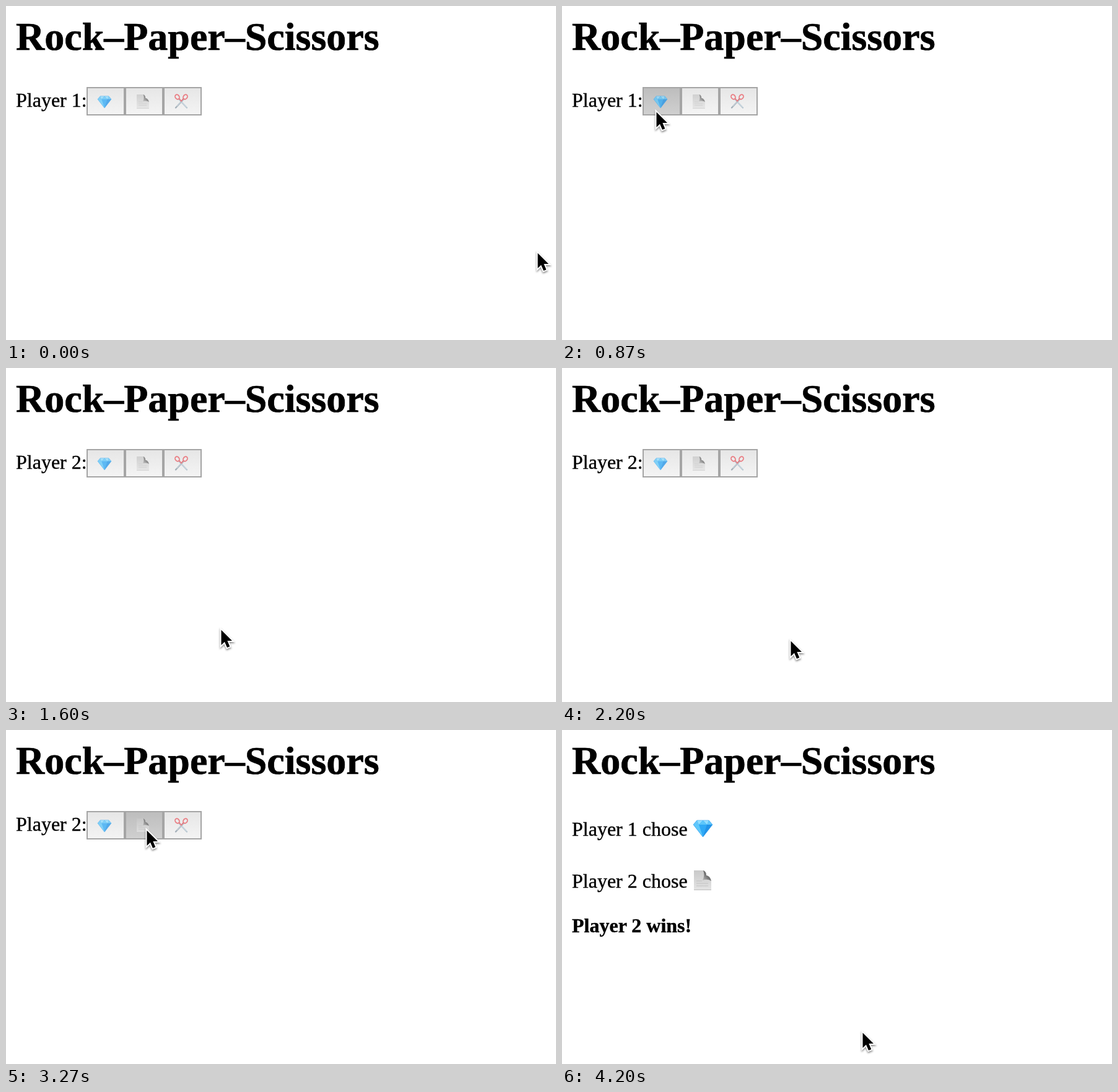
These frames come from a looping animation (888 by 540 pixels, 5.93 s). An HTML page:

```html
<!DOCTYPE html>
<html lang="en">
<head>
<meta charset="utf-8">
<title>Rock–Paper–Scissors</title>
<style>
  html, body { margin: 0; width: 100%; height: 100%; overflow: hidden; background: #fff; }
  svg { display: block; width: 888px; height: 540px; }
  text { font: 32px "Liberation Serif", Times, serif; fill: #000; stroke: #000; stroke-width: .4; }
  .bold { font-weight: bold; }
  #title { font-size: 64px; stroke-width: .7; }
  .key { fill: url(#face); stroke: #a5a5a5; stroke-width: 2; }
  .key.down { fill: url(#pressed); }
  .icon { opacity: .76; }
  #cursor { filter: drop-shadow(0 2px 1.5px rgba(0, 0, 0, .45)); }
</style>
</head>
<body>
<svg viewBox="0 0 888 540">
  <defs>
    <linearGradient id="face" x2="0" y2="1">
      <stop stop-color="#e6e6e6"/><stop offset="1" stop-color="#f4f4f4"/>
    </linearGradient>
    <linearGradient id="pressed" x2="0" y2="1">
      <stop stop-color="#bdbdbd"/><stop offset="1" stop-color="#d0d0d0"/>
    </linearGradient>
    <linearGradient id="sheet" x2="0" y2="1">
      <stop stop-color="#c9c9c9"/><stop offset="1" stop-color="#e4e4e4"/>
    </linearGradient>
    <linearGradient id="curl" x1="1" y1="0" x2="0" y2="1">
      <stop stop-color="#3c3c3c"/><stop offset=".55" stop-color="#777"/><stop offset="1" stop-color="#c4c4c4"/>
    </linearGradient>

    <g id="gem">
      <path d="M6 1H25L31 8L15.5 28L0 8Z" fill="#2fa9f6"/>
      <path d="M6 1L9 8H0ZM25 1L22 8H31Z" fill="#62c6fa"/>
      <path d="M6 1H15.5L9 8ZM25 1H15.5L22 8Z" fill="#93deff"/>
      <path d="M15.5 1L9 8H22Z" fill="#5cc6fb"/>
      <path d="M0 8H9L15.5 28Z" fill="#5fc8fb"/>
      <path d="M31 8H22L15.5 28Z" fill="#2293e8"/>
      <path d="M0 8L6 1H25L31 8L15.5 28Z" fill="none" stroke="#3aa2ec" stroke-width=".6"/>
    </g>

    <g id="paper">
      <path d="M0 0H16Q20 2 20 8Q26 9 28 16V32H0Z" fill="url(#sheet)"/>
      <path d="M15 0Q20 2 20 8Q26 9 28 17Q22 13 14 16Q18 8 15 0Z" fill="url(#curl)"/>
      <path d="M4 17H13M4 21H23M4 25H23" stroke="#c2c2c2"/>
      <path d="M0 31.5H28" stroke="#bcbcbc"/>
    </g>

    <g id="scissors" fill="none" stroke-linecap="round">
      <path d="M7.5 9L20 22.5" stroke="#9fb4c2" stroke-width="2.2"/>
      <path d="M14.5 9L2 22.5" stroke="#8798a4" stroke-width="2.2"/>
      <path d="M8.5 10L19.5 21.5M13.5 10L4 20" stroke="#d3e2ec"/>
      <path d="M8 8L11 12L14 8" stroke="#e0525a" stroke-width="1.6"/>
      <ellipse cx="4.5" cy="5" rx="3.2" ry="4" transform="rotate(-35 4.5 5)" stroke="#ea5a62" stroke-width="1.8"/>
      <ellipse cx="17.5" cy="5" rx="3.2" ry="4" transform="rotate(35 17.5 5)" stroke="#ea5a62" stroke-width="1.8"/>
    </g>
  </defs>

  <text id="title" class="bold" x="16" y="71">Rock–Paper–Scissors</text>

  <g id="choosing">
    <text id="turn" x="16" y="163">Player 1:</text>
    <rect class="key" x="131" y="132" width="60" height="44"/>
    <rect class="key" x="193" y="132" width="60" height="44"/>
    <rect class="key" x="255" y="132" width="60" height="44"/>
    <use class="icon" href="#gem" transform="translate(148 145) scale(.71)"/>
    <use class="icon" href="#paper" transform="translate(211 143) scale(.71)"/>
    <use class="icon" href="#scissors" transform="translate(272 142)"/>
  </g>

  <g id="result">
    <text x="16" y="171">Player 1 chose</text>
    <use href="#gem" x="212" y="145"/>
    <text x="16" y="255">Player 2 chose</text>
    <use href="#paper" x="213" y="227"/>
    <text class="bold" x="16" y="327">Player 2 wins!</text>
  </g>

  <g id="cursor">
    <path d="M4.5 3.5V28L10 22.7L14 32L18.3 30.2L14.4 21H22Z" stroke="#fff" stroke-width="4" paint-order="stroke"/>
  </g>
</svg>
<script>
  const LOOP = 5930, TICK = 200 / 3;
  const $ = id => document.getElementById(id);
  const keys = document.querySelectorAll(".key");

  // Pointer stops: tick, x, y, power applied to the easing into the stop
  const stops = [
    [0, 854, 396], [9, 164, 182, 1.25], [11, 148, 170],
    [12, 148, 170], [13, 148, 168], [19, 148, 168],
    [20, 149, 166], [25, 365, 450], [32, 365, 450],
    [33, 365, 438], [41, 239, 206], [46, 223, 159],
    [55, 223, 159], [63, 481, 486]
  ];

  const smooth = p => p * p * (3 - 2 * p);

  function pointer(tick) {
    const i = stops.findIndex(s => s[0] > tick);
    if (i < 0) return stops[stops.length - 1].slice(1, 3);
    const [t0, x0, y0] = stops[i - 1];
    const [t1, x1, y1, power = 1] = stops[i];
    const p = smooth((tick - t0) / (t1 - t0)) ** power;
    return [x0 + (x1 - x0) * p, y0 + (y1 - y0) * p];
  }

  function show(el, on) {
    el.style.display = on ? "" : "none";
  }

  function draw(ms) {
    const tick = Math.floor((ms % LOOP + 4) / TICK);
    const [x, y] = pointer(tick);
    $("cursor").setAttribute("transform", `translate(${Math.round(x)} ${Math.round(y)})`);
    $("turn").textContent = `Player ${tick < 16 ? 1 : 2}:`;
    keys[0].classList.toggle("down", tick >= 13 && tick < 16);
    keys[1].classList.toggle("down", tick >= 49 && tick < 53);
    show($("choosing"), tick < 53);
    show($("result"), tick >= 53);
  }

  const start = performance.now();
  function loop() {
    draw(performance.now() - start);
    requestAnimationFrame(loop);
  }
  loop();
</script>
</body>
</html>
```
